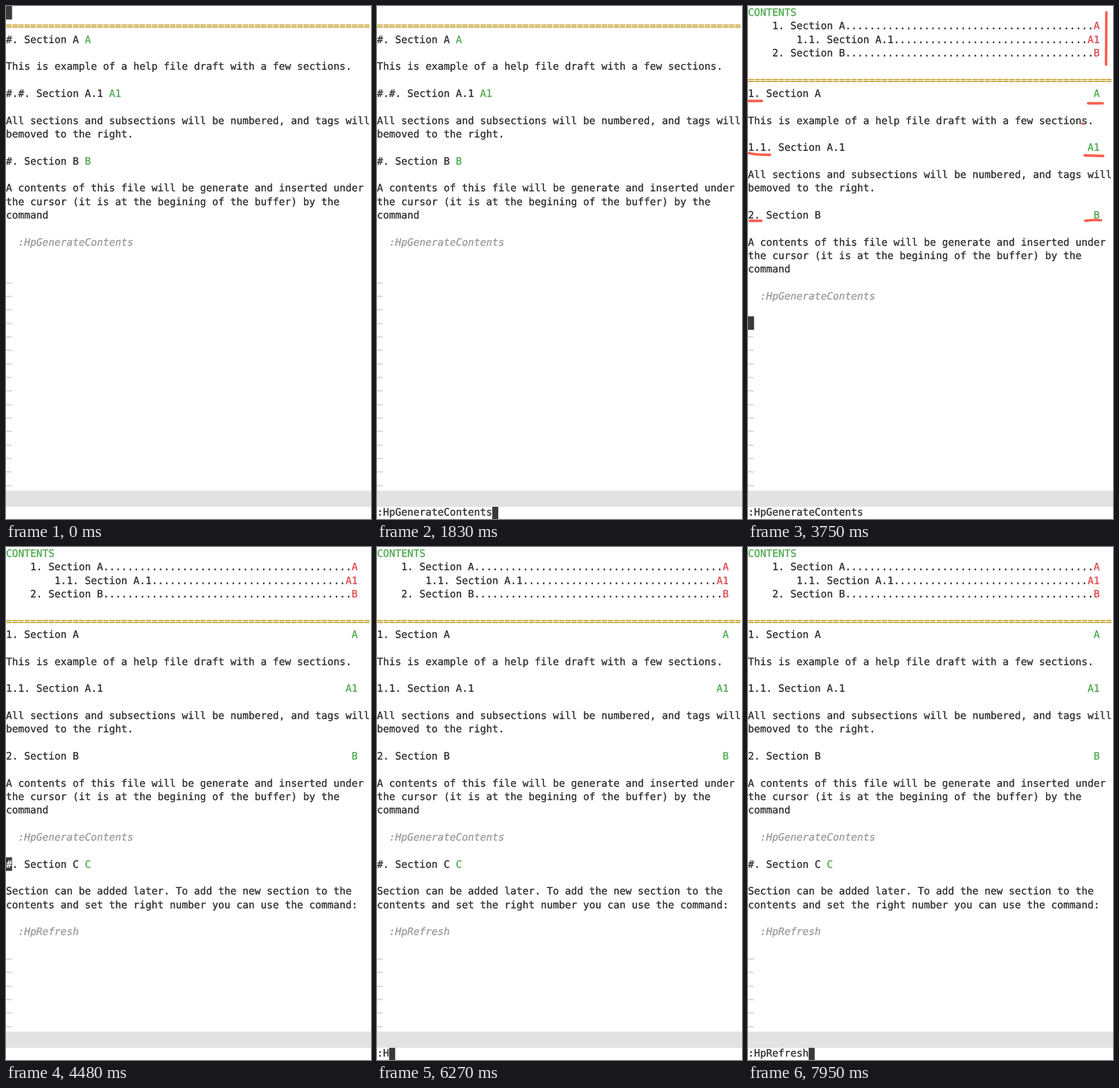
Animation of 632x886 px, one loop 8000 ms. Source, as an HTML page:

```html
<!DOCTYPE html>
<html lang="en">
<head>
<meta charset="utf-8">
<title>Help file contents generator</title>
<style>
  html, body { margin: 0; height: 100%; overflow: hidden; background: #fff; }
  svg { display: block; width: 100%; height: 100%; }
  text {
    font: 17.44px "DejaVu Sans Mono", monospace;
    text-rendering: geometricPrecision;
    white-space: pre;
    color: #303030;
    fill: currentColor;
    stroke: currentColor;
    stroke-width: .4;
  }
  .tag { color: #50aa50; }
  .link { color: #df4b50; }
  .rule { color: #bf9a1c; }
  .code { color: #9c9c9c; font-style: italic; }
  .tilde { color: #cbcbcb; }
  .inverse { color: #fff; }
  .pen path { fill: none; stroke: #f9604f; stroke-width: 4.4; stroke-linecap: round; stroke-linejoin: round; }
</style>
</head>
<body>
<svg id="screen" viewBox="0 0 632 886"></svg>
<script>
const LOOP = 8000, COL = 10.5, ROW = 70 / 3, BASELINE = 17;
const STATUS_ROW = 36, COMMAND_ROW = 37;
const DARK = '#3a3a3a', GREEN = '#50aa50';

const CHANGE_MARKS = [
  'M620.5 11L620 101', 'M1 164L24 164', 'M2 254Q12 257 38 257', 'M3 371L23 371',
  'M589 168L614 168', 'M583 258L615 259', 'M584 371Q600 369 611 370', 'M579 203h.1'
];
const ADDITION_MARK = ['M620 535L622 679'];

// A screen holds from its time until the next; unset fields carry over.
const steps = [
  { at: 0, contents: false, added: false, command: '', cursor: [0, 0], marks: [] },
  { at: 1060, command: ':', cursor: null },
  { at: 1250, command: ':H' },
  { at: 1510, command: ':Hp' },
  { at: 1700, command: ':HpG' },
  { at: 1830, command: ':HpGenerateContents' },
  { at: 2290, contents: true, cursor: [0, 0] },
  { at: 3750, cursor: [23, 0], marks: CHANGE_MARKS },
  { at: 4480, added: true, command: '', marks: [] },
  { at: 5410, command: ':', cursor: null, marks: ADDITION_MARK },
  { at: 6270, command: ':H', marks: [] },
  { at: 7370, command: ':Hp' },
  { at: 7760, command: ':HpR' },
  { at: 7855, command: ':HpRe' },
  { at: 7950, command: ':HpRefresh' }
];
const screens = [];
for (const step of steps) screens.push({ ...screens.at(-1), ...step });

// A line is a list of [text, class] runs.
const plain = text => [[text, '']];
const code = name => [['  :' + name, 'code']];
const blank = [];

function heading(number, title, tag, numbered) {
  const label = `${numbered ? number : number.replace(/\d/g, '#')}. ${title}`;
  const text = numbered ? label.padEnd(58 - tag.length) : label + ' ';
  return [[text, ''], [tag, 'tag']];
}

function entry(indent, label, tag) {
  return [[(' '.repeat(indent) + label).padEnd(58 - tag.length, '.'), ''], [tag, 'link']];
}

function bufferLines({ contents, added }) {
  const top = contents ? [
    [['CONTENTS', 'tag']],
    entry(4, '1. Section A', 'A'),
    entry(8, '1.1. Section A.1', 'A1'),
    entry(4, '2. Section B', 'B'),
    blank
  ] : [blank];
  const addition = added ? [
    heading('3', 'Section C', 'C', false),
    blank,
    plain('Section can be added later. To add the new section to the'),
    plain('contents and set the right number you can use the command:'),
    blank,
    code('HpRefresh')
  ] : [];
  const lines = [
    ...top,
    [['='.repeat(60), 'rule']],
    heading('1', 'Section A', 'A', contents),
    blank,
    plain('This is example of a help file draft with a few sections.'),
    blank,
    heading('1.1', 'Section A.1', 'A1', contents),
    blank,
    plain('All sections and subsections will be numbered, and tags will'),
    plain('bemoved to the right.'),
    blank,
    heading('2', 'Section B', 'B', contents),
    blank,
    plain('A contents of this file will be generate and inserted under'),
    plain('the cursor (it is at the begining of the buffer) by the'),
    plain('command'),
    blank,
    code('HpGenerateContents'),
    blank,
    ...addition,
    blank
  ];
  while (lines.length < STATUS_ROW) lines.push([['~', 'tilde']]);
  return lines;
}

function drawText(row, col, text, className) {
  const y = Math.round(row * ROW + BASELINE);
  return `<text x="${col * COL}" y="${y}" class="${className}">${text}</text>`;
}

function drawLine(runs, row) {
  let col = 0, out = '';
  for (const [text, className] of runs) {
    out += drawText(row, col, text, className);
    col += text.length;
  }
  return out;
}

function drawCursor([row, col], lines) {
  const [text, className] = lines[row]?.[0] ?? ['', ''];
  const color = className === 'tag' ? GREEN : DARK;
  return `<rect x="${col * COL}" y="${Math.floor(row * ROW)}" width="${COL}" height="${ROW}" fill="${color}"/>`
    + drawText(row, col, text.charAt(col), 'inverse');
}

function drawScreen(screen) {
  const lines = bufferLines(screen);
  const cursor = screen.cursor ?? [COMMAND_ROW, screen.command.length];
  return lines.map(drawLine).join('')
    + drawText(COMMAND_ROW, 0, screen.command, '')
    + drawCursor(cursor, lines)
    + '<rect y="837" width="632" height="28" fill="#e2e2e2"/>'
    + `<g class="pen">${screen.marks.map(d => `<path d="${d}"/>`).join('')}</g>`;
}

const svg = document.getElementById('screen');
let shown = null;

function render() {
  const time = performance.now() % LOOP;
  const screen = screens.findLast(s => s.at <= time);
  if (screen !== shown) {
    svg.innerHTML = drawScreen(screen);
    shown = screen;
  }
  requestAnimationFrame(render);
}
render();
</script>
</body>
</html>
```
